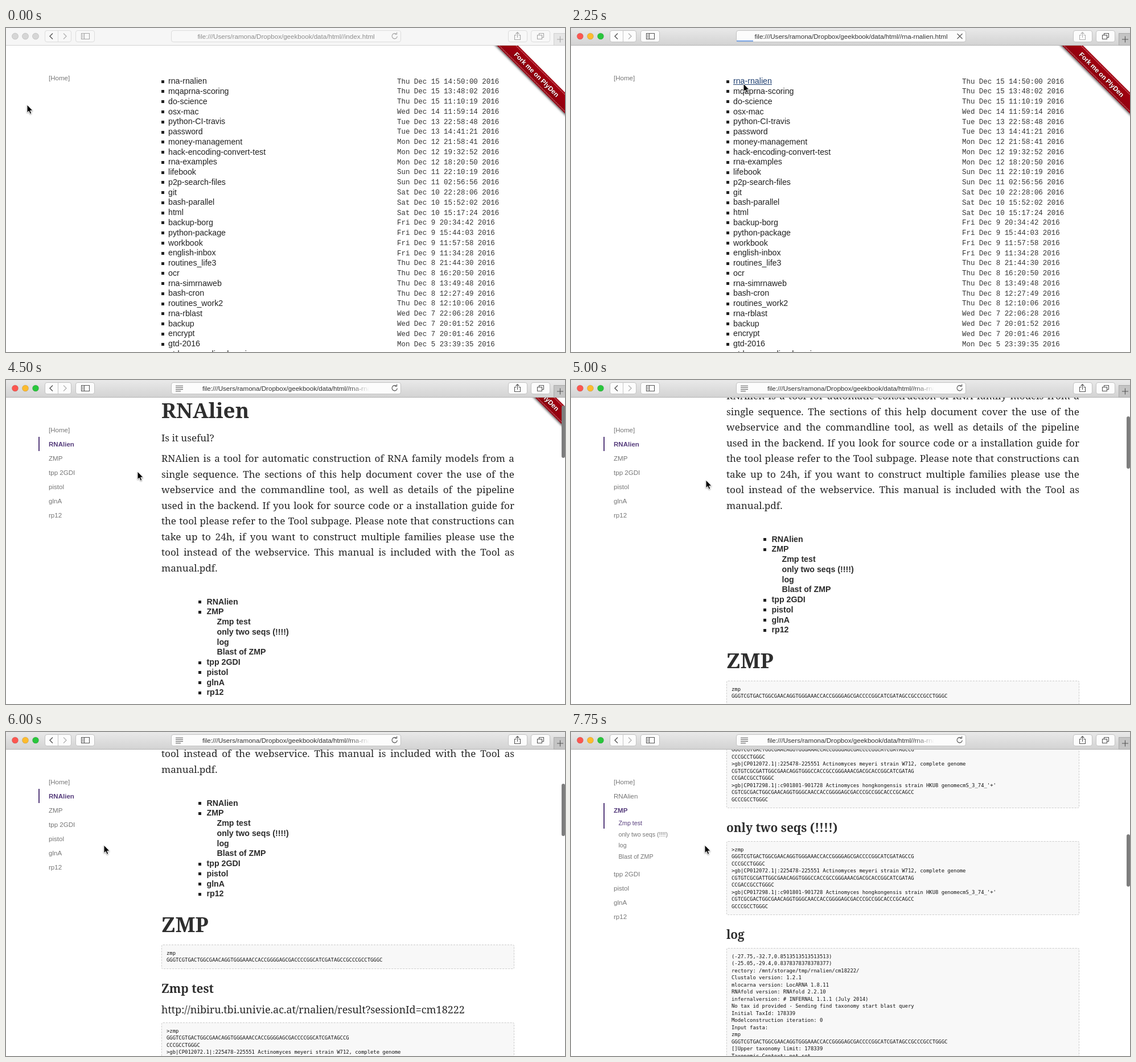
An HTML page for the animation above (8 s loop, 982 by 570 pixels).

```html
<!DOCTYPE html>
<html lang="en">
<head>
<meta charset="utf-8">
<title>Notebook browsing</title>
<style>
html, body { margin: 0; width: 100%; height: 100%; overflow: hidden; background: #fff; }
#stage { position: relative; width: 982px; height: 570px; overflow: hidden; color: #333;
  font: 14.2px "Liberation Sans", Arial, sans-serif; }
#stage div, #stage svg { position: absolute; }
/* zero line height centres each line of text on its top coordinate */
.t { line-height: 0; white-space: pre; }
.link { color: #222; }
.link.hover { color: #1f3f70; }
.link.hover::after { content: ""; position: absolute; left: 0; right: 0; top: 6px; height: 1px; background: #1f3f70; }
.date { font: 12.44px/0 "Liberation Mono", "Courier New", monospace; }
.dot { width: 5px; height: 5px; background: #222; }
.b { font-weight: bold; color: #2b2b2b; }
.p, .h1, .h2 { font: 17.1px/0 "Noto Serif", Georgia, serif; color: #262626; }
.h1 { font-size: 36.8px; font-weight: bold; color: #2e2e2e; }
.h2 { font-size: 20.8px; font-weight: bold; color: #2e2e2e; }
.big { font-size: 18px; }
.just { width: 620px; white-space: nowrap; text-align: justify; text-align-last: justify; }
.pre { box-sizing: border-box; left: 273px; width: 620px; padding: 8px; border: 1px dashed #ccc; border-radius: 3px;
  background: #f8f8f8; color: #111; white-space: pre; font: 8.88px/12.47px "DejaVu Sans Mono", monospace; }
.nav { font-size: 11.55px; color: #767676; }
.sub { font-size: 10.66px; }
.on { color: #563d7c; }
.nav.on:not(.sub) { font-weight: bold; }
.bar { left: 57px; width: 2px; background: #563d7c; }
#ribbon { left: 832px; top: 69px; width: 200px; height: 26px; transform: rotate(45deg); background: linear-gradient(#a30010, #90000e);
  box-shadow: 0 2px 4px rgba(0,0,0,.6); text-align: center; color: #fff;
  font: bold 11.7px/26px "Liberation Sans", Arial, sans-serif; text-shadow: 0 1px 2px rgba(0,0,0,.5); }
#ribbon::after { content: ""; position: absolute; inset: 2px 0; border: dotted rgba(255,255,255,.75); border-width: 1px 0; }
#thumb { left: 976px; width: 6px; height: 92px; border-radius: 3px; background: #7d7d7d; }
#bar { --line: #c3c3c3; --ink: #555; --btn: #fcfcfc; left: 0; top: 0; width: 982px; height: 30px;
  border-bottom: 1px solid #b4b4b4; background: linear-gradient(#e9e9e9, #d3d3d3); }
#bar.idle { --line: #dcdcdc; --ink: #a5a5a5; --btn: #f8f8f8; background: #f6f6f6; border-color: #d2d2d2; }
#bar .box { fill: var(--btn); stroke: var(--line); }
#bar .ic { fill: none; stroke: var(--ink); stroke-width: 1.1; }
#bar .lamp { stroke: rgba(0,0,0,.12); }
#bar.idle .lamp { fill: #d6d6d6; }
#bar .tab { fill: #c4c4c4; stroke: #aaa; }
#bar.idle .tab { fill: #e6e6e6; stroke: #d0d0d0; }
#url { left: 290px; top: 4px; width: 404px; line-height: 21px; font-size: 11.6px; text-align: center; white-space: nowrap; color: #333; }
.idle #url { color: #8d8d8d; }
#url.fade { left: 345px; width: 293px; text-align: left; overflow: hidden;
  -webkit-mask-image: linear-gradient(90deg, #000 88%, transparent); mask-image: linear-gradient(90deg, #000 88%, transparent); }
</style>
</head>
<body>
<div id="stage">
  <div id="index"></div>
  <div id="doc"></div>
  <div id="ribbon">Fork me on PlyDen</div>
  <div id="menu"></div>
  <div id="thumb"></div>
  <div id="bar">
    <svg width="982" height="31">
      <circle class="lamp" cx="16" cy="14.5" r="5.5" fill="#fc5650"/>
      <circle class="lamp" cx="34" cy="14.5" r="5.5" fill="#fdbb2e"/>
      <circle class="lamp" cx="52" cy="14.5" r="5.5" fill="#29c63c"/>
      <g class="box">
        <rect x="68.500" y="4.500" width="46" height="20" rx="3.500"/><path d="M91.500 5V24"/>
        <rect x="122.500" y="4.500" width="33" height="20" rx="3.500"/>
        <rect x="290.500" y="4.500" width="403" height="20" rx="3.500"/>
        <rect x="882.500" y="4.500" width="33" height="20" rx="3.500"/>
        <rect x="922.500" y="4.500" width="33" height="20" rx="3.500"/>
      </g>
      <rect class="tab" x="962.500" y="9.500" width="24" height="21"/>
      <path class="ic" d="M968 20H979M973.500 14.500V25.500"/>
      <path class="ic" d="M82 9.500L77 14.500L82 19.500" style="stroke:#555;stroke-width:1.400"/>
      <path class="ic" d="M101 9.500L106 14.500L101 19.500" style="stroke:#b4b4b4;stroke-width:1.400"/>
      <path class="ic" d="M132.500 9.500H146.500V19.500H132.500ZM137.500 9.500V19.500M134 12H136M134 14.500H136M134 17H136"/>
      <path class="ic" id="share" d="M896.500 12.500H893.500V20.500H903.500V12.500H900.500M898.500 17V8M895.500 10.500L898.500 7.500L901.500 10.500"/>
      <path class="ic" d="M933.500 12.500H941.500V19.500H933.500ZM936.500 12V9.500H944.500V16.500H942"/>
      <path class="ic" id="reader" d="M298 10.500H311M298 13.500H311M298 16.500H311M298 19.500H307"/>
      <path class="ic" id="reload" d="M685.800 10.800A4.600 4.600 0 1 0 687.300 14.500M683 10.900H686.600V7.400"/>
      <path class="ic" id="stop" d="M678.500 10L687.500 19M687.500 10L678.500 19"/>
      <path id="load" d="M291 22.800H320" stroke="#5a8fe0" stroke-width="1.600"/>
    </svg>
    <div id="url"></div>
  </div>
  <svg id="cursor" width="18" height="24" viewBox="-2 -2 18 24" style="left:-2px;top:-2px;filter:drop-shadow(0 1px 1px rgba(0,0,0,.4))">
    <path d="M0 0V14L3.200 11.200L5.300 16.200L7.800 15.200L5.700 10.300H10Z" fill="#000" stroke="#fff"/>
  </svg>
</div>
<script>
const $ = id => document.getElementById(id);
const show = (id, on) => $(id).style.display = on ? "" : "none";

function put(parent, x, y, text, cls = "") {
  const el = document.createElement("div");
  el.className = cls;
  el.style.left = x + "px";
  el.style.top = y + "px";
  el.textContent = text;
  return parent.appendChild(el);
}

const ROW = 17.77;
const notes = `rna-rnalien|Thu Dec 15 14:50:00 2016
mqaprna-scoring|Thu Dec 15 13:48:02 2016
do-science|Thu Dec 15 11:10:19 2016
osx-mac|Wed Dec 14 11:59:14 2016
python-CI-travis|Tue Dec 13 22:58:48 2016
password|Tue Dec 13 14:41:21 2016
money-management|Mon Dec 12 21:58:41 2016
hack-encoding-convert-test|Mon Dec 12 19:32:52 2016
rna-examples|Mon Dec 12 18:20:50 2016
lifebook|Sun Dec 11 22:10:19 2016
p2p-search-files|Sun Dec 11 02:56:56 2016
git|Sat Dec 10 22:28:06 2016
bash-parallel|Sat Dec 10 15:52:02 2016
html|Sat Dec 10 15:17:24 2016
backup-borg|Fri Dec 9 20:34:42 2016
python-package|Fri Dec 9 15:44:03 2016
workbook|Fri Dec 9 11:57:58 2016
english-inbox|Fri Dec 9 11:34:28 2016
routines_life3|Thu Dec 8 21:44:30 2016
ocr|Thu Dec 8 16:20:50 2016
rna-simrnaweb|Thu Dec 8 13:49:48 2016
bash-cron|Thu Dec 8 12:27:49 2016
routines_work2|Thu Dec 8 12:10:06 2016
rna-rblast|Wed Dec 7 22:06:28 2016
backup|Wed Dec 7 20:01:52 2016
encrypt|Wed Dec 7 20:01:46 2016
gtd-2016|Mon Dec 5 23:39:35 2016
gtd-acc-reading-learning|`.split("\n");
const links = notes.map((note, i) => {
  const [name, date] = note.split("|"), y = 93.2 + i * ROW;
  put($("index"), 273, y - 1.5, "", "dot");
  put($("index"), 687, y + 1.3, date, "t date");
  return put($("index"), 285, y, name, "t link");
});

const doc = $("doc");
const intro = `RNAlien is a tool for automatic construction of RNA family models from a
single sequence. The sections of this help document cover the use of the
webservice and the commandline tool, as well as details of the pipeline
used in the backend. If you look for source code or a installation guide for
the tool please refer to the Tool subpage. Please note that constructions can
take up to 24h, if you want to construct multiple families please use the
tool instead of the webservice. This manual is included with the Tool as`.split("\n");
const head = "GGGTCGTGACTGGCGAACAGGTGGGAAACCACCGGGGAGCGACCCCGGCATCGATAGCCG", tail = "CCCGCCTGGGC";
const fasta = `>zmp
${head}
${tail}
>gb|CP012072.1|:225478-225551 Actinomyces meyeri strain W712, complete genome
CGTGTCGCGATTGGCGAACAGGTGGGCCACCGCCGGGAAACGACGCACCGGCATCGATAG
CCGACCGCCTGGGC
>gb|CP017298.1|:c901801-901728 Actinomyces hongkongensis strain HKU8 genomecmS_3_74_'+'
CGTCGCGACTGGCGAACAGGTGGGCAACCACCGGGGAGCGACCCGCCGGCACCCGCAGCC
GCCCGCCTGGGC`;
const log = `(-27.75,-32.7,0.8513513513513513)
(-25.05,-29.4,0.8378378378378377)
rectory: /mnt/storage/tmp/rnalien/cm18222/
Clustalo version: 1.2.1
mlocarna version: LocARNA 1.8.11
RNAfold version: RNAfold 2.2.10
infernalversion: # INFERNAL 1.1.1 (July 2014)
No tax id provided - Sending find taxonomy start blast query
Initial TaxId: 178339
Modelconstruction iteration: 0
Input fasta:
zmp
${head + tail}
[]Upper taxonomy limit: 178339
Taxonomic Context: not set`;
const topics = ["RNAlien", "ZMP", "tpp 2GDI", "pistol", "glnA", "rp12"];
const subs = ["Zmp test", "only two seqs (!!!!)", "log", "Blast of ZMP"];

put(doc, 273, 120, "RNAlien", "t h1");
put(doc, 273, 169, "Is it useful?", "t p");
intro.forEach((line, i) => put(doc, 273, 205 + i * 27.57, line, "t p just"));
put(doc, 273, 398, "manual.pdf.", "t p");
[...topics.slice(0, 2), ...subs, ...topics.slice(2)].forEach((name, i) => {
  const y = 456.5 + i * ROW, sub = subs.includes(name);
  if (!sub) put(doc, 338, y - 1.5, "", "dot");
  put(doc, sub ? 370.5 : 352.5, y, name, "t b");
});
put(doc, 273, 670, "ZMP", "t h1");
put(doc, 273, 706, "zmp\n" + head + tail, "pre");
put(doc, 273, 783, subs[0], "t h2");
put(doc, 273, 820, "http://nibiru.tbi.univie.ac.at/rnalien/result?sessionId=cm18222", "t p big");
put(doc, 273, 843, fasta, "pre");
put(doc, 273, 1006.5, subs[1], "t h2");
put(doc, 273, 1031, fasta, "pre");
put(doc, 273, 1195, subs[2], "t h2");
put(doc, 273, 1219, log, "pre");

// level: 0 home only, 1 nothing active, 2 RNAlien, 3 ZMP, 4 ZMP with its first part
let shown = -1;
function drawMenu(level) {
  if (level === shown) return;
  shown = level;
  const menu = $("menu");
  menu.textContent = "";
  put(menu, 75, 87.7, "[Home]", "t nav");
  if (!level) return;
  const open = level > 2, active = open ? 1 : level - 2;
  topics.forEach((name, i) => put(menu, 75, 112.5 + i * 25 + (open && i > 1 ? 87 : 0), name, "t nav" + (i === active ? " on" : "")));
  if (open) subs.forEach((name, i) => put(menu, 83.5, 160 + i * 19.5, name, "t nav sub" + (level === 4 && !i ? " on" : "")));
  if (active >= 0) put(menu, 57, open ? 125 : 100, "", "bar").style.height = (open ? 45 : 25) + "px";
}

const scrollKeys = [[4000, 0], [4250, 18], [4500, 67], [5250, 232], [5500, 258], [6500, 405], [7250, 528], [7500, 685], [7750, 839]];
const cursorKeys = [[0, 37, 135], [250, 48, 150], [500, 88, 166], [750, 170, 158], [1000, 258, 118], [1250, 297, 98],
  [1500, 297, 98], [1750, 303, 98], [2500, 303, 98], [3250, 255, 142], [3500, 231, 151], [4250, 231, 151],
  [4500, 231, 161], [5500, 242, 190], [6000, 172, 199], [6500, 164, 200], [7250, 213, 196], [7750, 235, 199]];

function at(keys, t) {
  const n = keys.findIndex(k => k[0] > t);
  if (n === 0) return keys[0].slice(1);
  if (n < 0) return keys[keys.length - 1].slice(1);
  const a = keys[n - 1], b = keys[n], f = (t - a[0]) / (b[0] - a[0]);
  return a.slice(1).map((v, i) => Math.round(v + (b[i + 1] - v) * f));
}

const path = "file:///Users/ramona/Dropbox/geekbook/data/html//";
const start = performance.now();
function draw(now) {
  const t = Math.floor(Math.max(0, now - start) % 8000 / 250) * 250;
  const loading = t === 2250, opened = t >= 2500;
  const [scroll] = at(scrollKeys, t), [x, y] = at(cursorKeys, t);

  $("bar").className = t < 500 ? "idle" : "";
  $("url").className = opened ? "fade" : "";
  $("url").textContent = path + (t < 2250 ? "index.html" : "rna-rnalien.html");
  $("share").style.opacity = loading ? .45 : 1;
  show("reader", opened);
  show("reload", !loading);
  show("stop", loading);
  show("load", loading);

  show("index", !opened);
  show("doc", opened);
  links[0].className = "t link" + (t >= 1250 ? " hover" : "");
  doc.style.transform = `translateY(${-scroll}px)`;
  $("ribbon").style.top = 69 - scroll + "px";
  show("thumb", scroll > 0);
  $("thumb").style.top = 33.3 + scroll * .1746 + "px";
  drawMenu(!opened ? 0 : scroll > 735 ? 4 : scroll > 630 ? 3 : scroll > 20 ? 2 : 1);
  $("cursor").style.transform = `translate(${x}px, ${y}px)`;
  requestAnimationFrame(draw);
}
draw(start);
</script>
</body>
</html>
```
